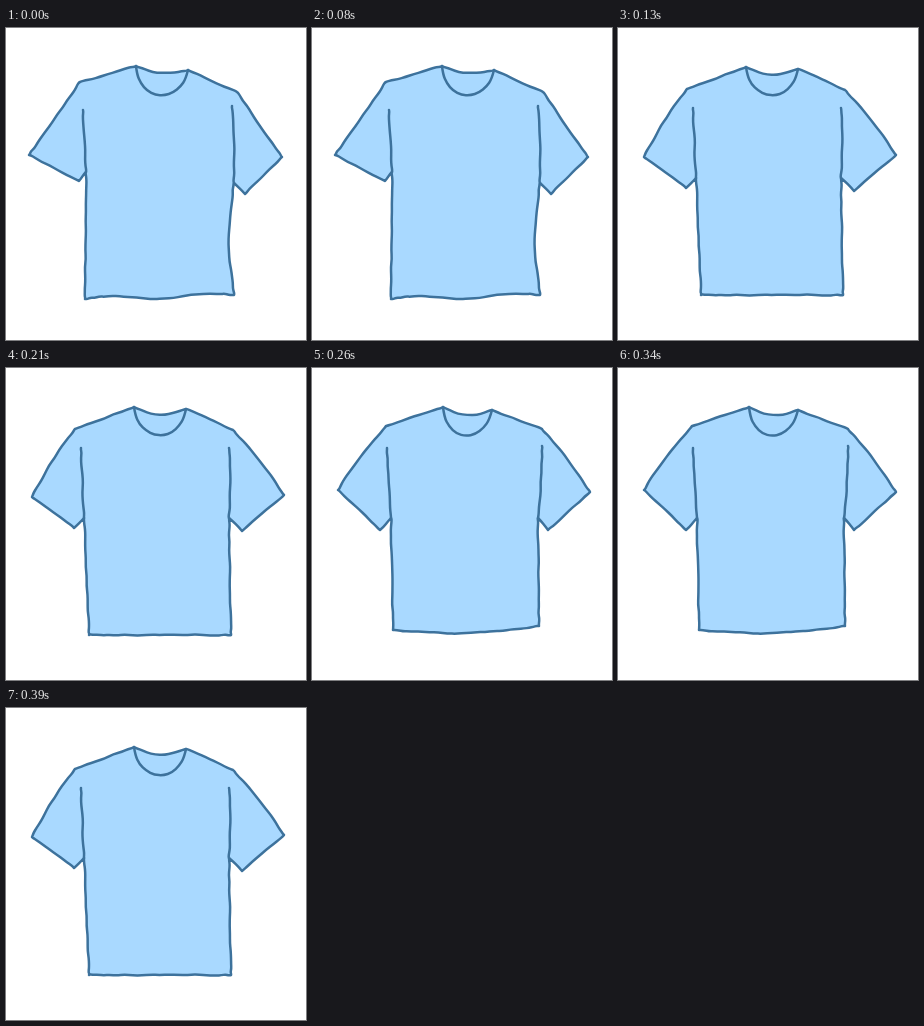
Recreate the animation shown at these times as an HTML page with a canvas. Size 300 by 312 pixels, loop 0.52 s.

```html
<!DOCTYPE html>
<html lang="en">
<head>
<meta charset="utf-8">
<title>T-shirt</title>
<style>
html, body { margin: 0; width: 100%; height: 100%; overflow: hidden; background: #fff; }
canvas { display: block; width: 300px; height: 312px; }
</style>
</head>
<body>
<canvas id="stage" width="300" height="312"></canvas>
<script>
const ctx = document.getElementById('stage').getContext('2d');
const STEP = 130;
const ORDER = [0, 1, 2, 1];
const FILL = '#a9d9ff';
const INK = '#3d729c';
const WOBBLE = 0.6;

// Corners of the shirt: left side, then right side.
const base = {
  neckL: [128, 39], shoulderL: [69, 61], tipL: [26, 129], cuffL: [68, 160],
  pitL: [78, 150], hemL: [83, 267], seamL: [75, 80],
  neckR: [180, 41], shoulderR: [227, 62], tipR: [278, 127], cuffR: [236, 163],
  pitR: [223, 150], hemR: [225, 267], seamR: [223, 80],
  sleeve: 2, waist: 0, sag: 0, wave: 0, collar: 7
};

const poses = [
  {
    ...base,
    neckL: [130, 38], shoulderL: [74, 54], tipL: [23, 127], cuffL: [73, 153],
    pitL: [80, 144], hemL: [79, 271], seamL: [77, 82],
    neckR: [182, 42], shoulderR: [231, 64], tipR: [276, 129], cuffR: [239, 166],
    pitR: [228, 155], hemR: [228, 267], seamR: [226, 78],
    sleeve: 0, waist: -5, wave: 2, collar: 5
  },
  base,
  {
    ...base,
    neckL: [131, 39], shoulderL: [74, 58], tipL: [26, 122], cuffL: [68, 162],
    pitL: [79, 150], hemL: [81, 262],
    neckR: [180, 42], shoulderR: [230, 61], tipR: [278, 124], cuffR: [236, 162],
    pitR: [226, 150], hemR: [227, 258], seamR: [230, 78],
    sag: 5
  }
];

function seeded(seed) {
  return () => {
    seed = (seed * 16807) % 2147483647;
    return seed / 2147483647;
  };
}

const bow = size => t => size * Math.sin(Math.PI * t);

// Draws a slightly shaky line from a to b, pushed sideways by bend(t).
function sketch(path, random, a, b, bend = bow(0)) {
  const dx = b[0] - a[0], dy = b[1] - a[1];
  const length = Math.hypot(dx, dy);
  const steps = Math.max(3, Math.round(length / 6));
  let prev = a;
  for (let i = 1; i < steps; i++) {
    const t = (1 - Math.cos(Math.PI * i / steps)) / 2;
    const push = (bend(t) + (random() * 2 - 1) * WOBBLE) / length;
    const next = [a[0] + dx * t - dy * push, a[1] + dy * t + dx * push];
    if (i > 1) {
      path.quadraticCurveTo(prev[0], prev[1], (prev[0] + next[0]) / 2, (prev[1] + next[1]) / 2);
    }
    prev = next;
  }
  path.quadraticCurveTo(prev[0], prev[1], b[0], b[1]);
}

function build(p, index) {
  const random = seeded(4211 + index * 97);
  const outline = new Path2D();
  const inner = new Path2D();
  const edge = (a, b, bend) => sketch(outline, random, a, b, bend);
  const line = (a, b, bend) => {
    inner.moveTo(a[0], a[1]);
    sketch(inner, random, a, b, bend);
  };

  outline.moveTo(p.neckL[0], p.neckL[1]);
  edge(p.neckL, p.shoulderL);
  edge(p.shoulderL, p.tipL, bow(p.sleeve));
  edge(p.tipL, p.cuffL);
  edge(p.cuffL, p.pitL);
  edge(p.pitL, p.hemL);
  edge(p.hemL, p.hemR, t => bow(p.sag)(t) - bow(p.wave)(3 * t));
  edge(p.hemR, p.pitR, bow(p.waist));
  edge(p.pitR, p.cuffR);
  edge(p.cuffR, p.tipR);
  edge(p.tipR, p.shoulderR, bow(p.sleeve));
  edge(p.shoulderR, p.neckR);
  edge(p.neckR, p.neckL, bow(-p.collar));
  outline.closePath();

  line(p.neckL, p.neckR, t => 28 * Math.sqrt(Math.sin(Math.PI * t)));
  line(p.seamL, p.pitL);
  line(p.pitR, p.seamR, bow(1));
  return { outline, inner };
}

const shirts = poses.map(build);

function draw({ outline, inner }) {
  ctx.fillStyle = '#fff';
  ctx.fillRect(0, 0, 300, 312);
  ctx.fillStyle = FILL;
  ctx.fill(outline);
  ctx.strokeStyle = INK;
  ctx.lineWidth = 2.5;
  ctx.lineCap = ctx.lineJoin = 'round';
  ctx.stroke(outline);
  ctx.stroke(inner);
}

function frame() {
  const step = Math.floor(performance.now() / STEP) % ORDER.length;
  draw(shirts[ORDER[step]]);
  requestAnimationFrame(frame);
}
frame();
</script>
</body>
</html>
```
